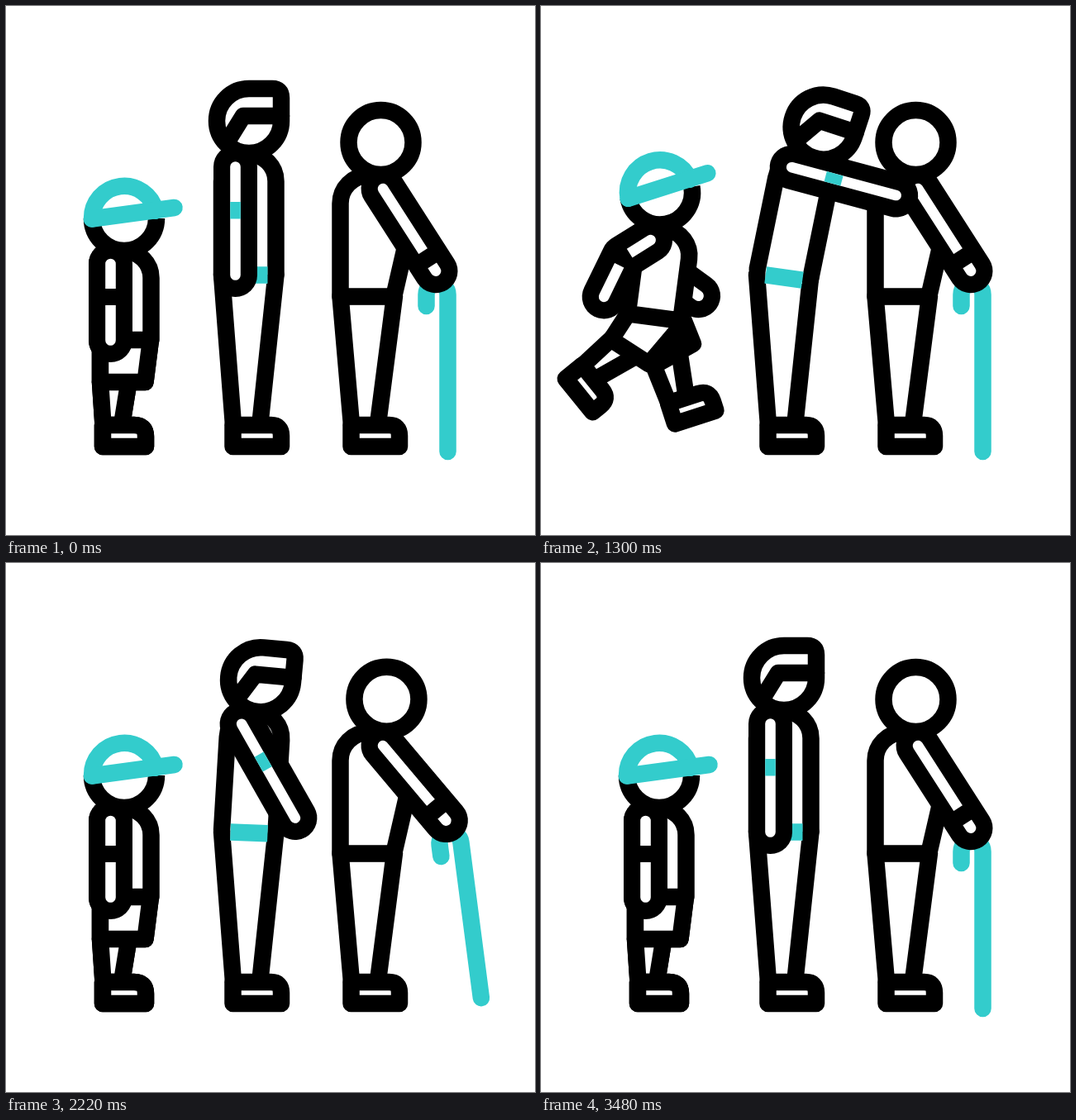
These frames come from a looping animation (640 by 640 pixels, 3600 ms). An HTML page with a canvas:

```html
<!DOCTYPE html>
<html lang="en">
<head>
<meta charset="utf-8">
<title>Three ages</title>
<style>
  html, body { margin: 0; height: 100%; overflow: hidden; background: #fff; }
  canvas { display: block; width: 100vw; height: 100vh; }
</style>
</head>
<body>
<canvas width="640" height="640"></canvas>
<script>
const ctx = document.querySelector('canvas').getContext('2d');
const LOOP = 3600, LINE = 20.5, ARM = 53, GAP = 12.6;
const BLACK = '#000', WHITE = '#fff', TEAL = '#33cccc';
const RAD = Math.PI / 180;

function ease(t, from, to) {
  const p = Math.min(1, Math.max(0, (t - from) / (to - from)));
  return p * p * (3 - 2 * p);
}

// Rises from 0 to 1, holds, and falls back to 0
const pulse = (t, start, top, leave, end) => ease(t, start, top) - ease(t, leave, end);

function stroke(path, color = BLACK, width = LINE, cap = 'round') {
  ctx.strokeStyle = color;
  ctx.lineWidth = width;
  ctx.lineCap = cap;
  ctx.lineJoin = 'round';
  ctx.stroke(new Path2D(path));
}

function shape(path, fill = WHITE) {
  ctx.fillStyle = fill;
  ctx.fill(new Path2D(path));
  stroke(path);
}

// Draw in a local frame placed at x, y and turned by deg
function at(x, y, deg, draw) {
  ctx.save();
  ctx.translate(x, y);
  ctx.rotate(deg * RAD);
  draw();
  ctx.restore();
}

function tube(path) {
  stroke(path, BLACK, ARM);
  stroke(path, WHITE, GAP);
}

// Point reached from x, y along a body part of the given length; 0 deg hangs down
const reachFrom = (x, y, deg, length) =>
  [x + length * Math.sin(deg * RAD), y + length * Math.cos(deg * RAD)];

const ring = r => `M${-r},0 A${r},${r} 0 0 1 ${r},0 A${r},${r} 0 0 1 ${-r},0 Z`;

// ---- Child ----
function childArm([x, y], upper, bend) {
  const lower = upper + bend;
  const elbow = reachFrom(x, y, upper, 39);
  tube(`M${x},${y} L${elbow} L${reachFrom(...elbow, lower, 53.5)}`);
  stroke(`M${reachFrom(...elbow, upper, -9)} L${elbow} L${reachFrom(...elbow, lower, 11)}`,
    BLACK, 18, 'butt');
}

function childLeg(x, y, thigh, shin, shorts) {
  at(x, y, thigh, () => {
    at(-12, 51, shin - thigh, () => {
      shape('M-17,0 L-13.5,52 H9 L17.5,0');
      shape('M-14,52 H24 Q38,52 38,66 V78 H-14 Z');
    });
    shape('M-29,0 V51 H25.5 L32,0', shorts);
  });
}

function child(t) {
  const wind = pulse(t, 0, 320, 320, 550);
  const hug = pulse(t, 320, 550, 550, 800);
  const reach = pulse(t, 320, 550, 550, 1000);
  const leap = pulse(t, 800, 1130, 1500, 1860);
  const air = wind + leap;

  const x = 143 + 11 * wind + 44 * hug - 6 * leap;
  const y = 404 - 27.5 * air;
  const lean = 18 * hug + 7.5 * leap - 10 * wind;
  const nod = 39 * reach - 10 * leap - 29 * wind;
  const swing = 81 * wind + 80 * reach - 58 * leap;
  const bend = 24 * wind + 32 * leap + 140 * reach * (1 - reach);
  const trail = 17 * wind + 24 * hug + 33 * leap;
  const lead = -29 * air - 14 * hug;

  const chest = reachFrom(x, y, 180 - lean, 92);
  const shoulder = reachFrom(...chest, -90 + lean, 0).map((v, i) =>
    v - 16.5 * (i ? Math.sin(lean * RAD) : Math.cos(lean * RAD)));
  const neck = reachFrom(x, y, 180 - lean, 107);
  const head = reachFrom(...neck, 180 - nod, 40);

  childArm(shoulder, -0.38 * swing, bend);
  childLeg(x, y, lead, 0.62 * lead, BLACK);
  childLeg(x, y, trail, trail + 18 * air, WHITE);
  at(x, y, lean, () => shape('M-32.5,0 V-75 A32.5,32.5 0 0 1 32.5,-75 V0 Z'));
  at(head[0], head[1] - 5.5 * air, nod, () => {
    ctx.fillStyle = WHITE;
    ctx.fill(new Path2D(ring(39)));
    stroke('M39,0 A39,39 0 0 1 -39,0', BLACK, LINE, 'butt');
    stroke('M-39,.5 A39,39 0 0 1 37.9,-9.3', TEAL);
    stroke('M-39,.5 L60.5,-13', TEAL);
  });
  childArm(shoulder, swing, bend);
}

// ---- Adults ----
const adultShoe = 'M0,507 H46 Q58.5,507 58.5,520 V533 H0 Z';

function man(t) {
  const lean = 1.2 * pulse(t, 720, 1500, 1640, 2500);
  const lift = 75.2 * pulse(t, 640, 1320, 1850, 2500);
  shape('M275,507 L261,325 L326.5,325 L307.2,507');
  at(274.5, 0, 0, () => shape(adultShoe));
  ctx.fillStyle = WHITE;
  ctx.fillRect(271.5, 310, 44.5, 26);
  at(294, 325, 11.5 * lean, () => shape('M-33,0 V-113 A32.75,32.75 0 0 1 32.5,-113 V0'));
  at(294, 325.5 + 3 * lean, 8 * lean, () => stroke('M-22.5,0 H22.5', TEAL, LINE, 'butt'));
  at(294 + 47.5 * lean, 139 + 7.5 * lean, 18 * lean, () => {
    shape('M39,0 A39,39 0 0 1 -39,0 A39,39 0 0 1 0,-39 H28 Q39,-39 39,-28 Z');
    stroke('M39,-6 H-7 L-25,23');
  });
  at(277.5 + 25.5 * lean, 194.5 + 0.7 * lean, -lift, () => {
    tube('M0,0 V131');
    stroke('M0,42.5 V63', TEAL, GAP, 'butt');
  });
}

function elder(t) {
  const push = 14.4 * pulse(t, 1790, 2635, 2635, 3480);
  shape('M418,507 L404.5,351 H470 L449.8,507');
  at(417.5, 0, 0, () => shape(adultShoe));
  at(453.5 + push * 0.935, 165 - push * 0.03, 0, () => shape(ring(39)));
  shape('M404.5,351.5 V239 A34,34 0 0 1 438,205 L487.5,272 L469.2,351.5 Z');
  at(456, 221, -push, () => {
    stroke('M52.5,142 V128 A13,13 0 0 1 78.5,128 V318', TEAL);
    ctx.rotate(57.3 * RAD);
    tube('M0,0 H118.5');
    stroke('M90,0 H110.5', BLACK, 18, 'butt');
  });
}

function frame(now) {
  const t = now % LOOP;
  ctx.fillStyle = WHITE;
  ctx.fillRect(0, 0, 640, 640);
  elder(t);
  man(t);
  child(t);
  requestAnimationFrame(frame);
}
requestAnimationFrame(frame);
</script>
</body>
</html>
```
